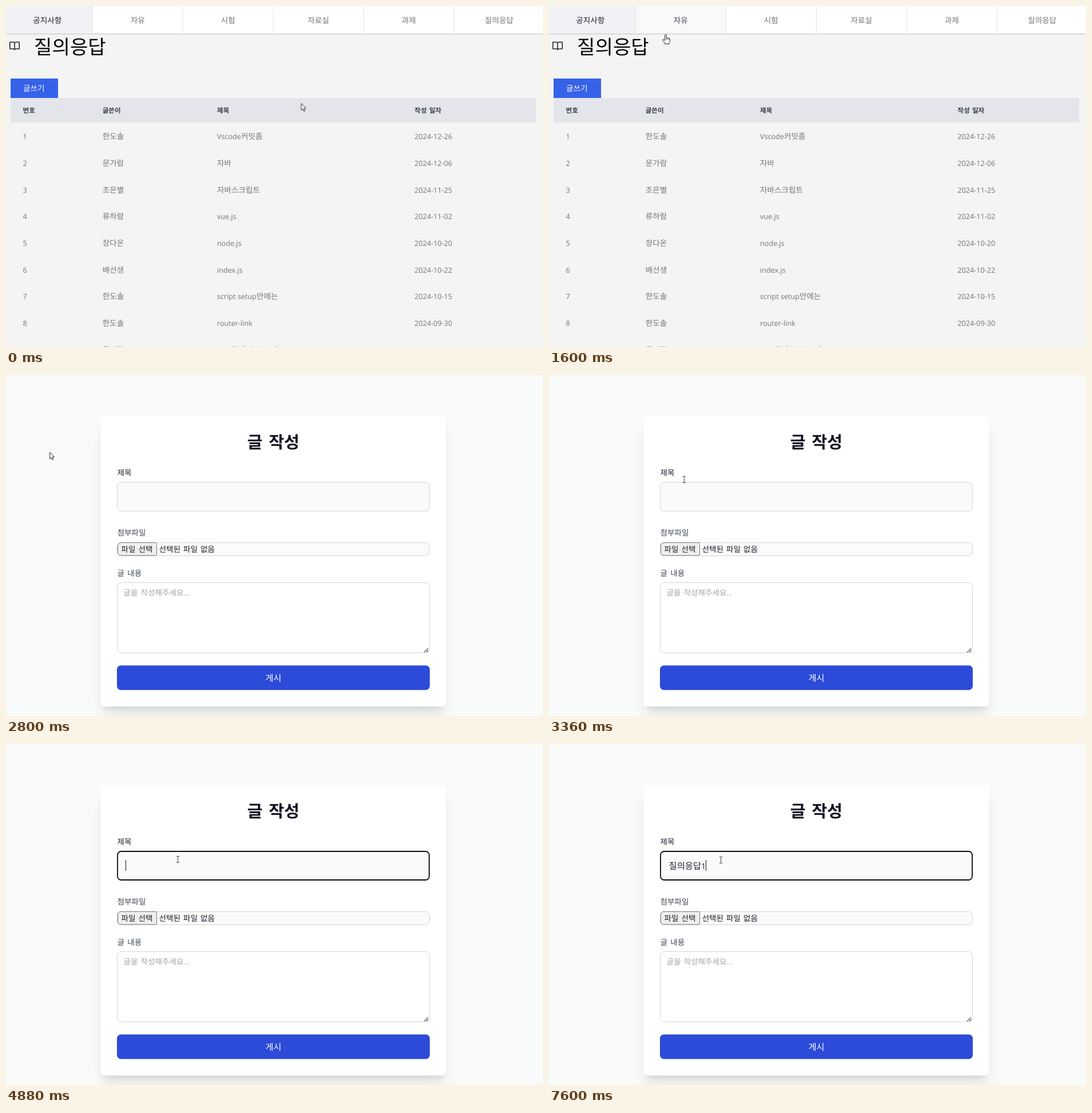
Write an HTML page that moves like this. It is 939 px wide and 597 px high and loops after 8000 ms.

```html
<!DOCTYPE html>
<html lang="ko">
<head>
<meta charset="utf-8">
<title>질의응답</title>
<style>
html, body { margin: 0; width: 100%; height: 100%; overflow: hidden; background: #f4f4f4; }
svg { display: block; width: 939px; height: 597px; }
text { font: 13.6px "Noto Sans CJK KR", "Noto Sans KR", sans-serif; fill: #70747b; white-space: pre; text-rendering: geometricPrecision; }
.latin { font-family: "Open Sans", "Noto Sans", sans-serif; font-size: 12.65px; }
.mid { text-anchor: middle; }
.head { font-size: 11.6px; font-weight: 700; fill: #343a48; word-spacing: 1px; }
.title { font-size: 34.2px; fill: #060608; }
.on { fill: #161b28; }
.white { fill: #fff; }
.label { fill: #3f4653; word-spacing: 1.4px; }
.dark { fill: #1b202c; word-spacing: 1.2px; }
.hint { fill: #a0a4ab; word-spacing: 1.2px; }
.big { font-size: 29.2px; font-weight: 700; fill: #111322; word-spacing: 2.6px; }
.post { font-size: 15.3px; font-weight: 500; }
.typed, .typed .latin { fill: #20242e; }
.typed { font-size: 15.4px; }
.typed .latin { font-size: 14px; }
.field { stroke: #d1d5db; }

/* 1% of the loop is 80 ms */
.list, .form, .tab, .tabText, .btn, .ring, .focus, .arrow, .hand, .beam { animation: 8s step-end infinite; }
.list { animation-name: list; }
.form { animation-name: form; }
.tab { animation-name: tab; }
.tabText { animation-name: tabText; }
.btn { animation-name: btn; }
.ring { animation-name: ring; }
.focus { animation-name: focus; }
.arrow { animation-name: arrow; }
.hand { animation-name: hand; }
.beam { animation-name: beam; }
.cursor { animation: path 8s linear infinite; }

@keyframes list { 0% { visibility: visible } 35%, 100% { visibility: hidden } }
@keyframes form { 0% { visibility: hidden } 35%, 100% { visibility: visible } }
@keyframes tab { 0% { fill: #fff } 16% { fill: #f8faf9 } 21%, 100% { fill: #fff } }
@keyframes tabText { 0% { fill: #70747b } 16% { fill: #454b57 } 21%, 100% { fill: #70747b } }
@keyframes btn { 0% { fill: #3662ea } 28%, 100% { fill: #2c4bd8 } }
@keyframes ring { 0% { opacity: 0 } 31%, 100% { opacity: 1 } }
@keyframes focus { 0% { opacity: 0 } 43%, 100% { opacity: 1 } }
@keyframes arrow { 0% { opacity: 1 } 16% { opacity: 0 } 21% { opacity: 1 } 28% { opacity: 0 } 35% { opacity: 1 } 42%, 100% { opacity: 0 } }
@keyframes hand { 0% { opacity: 0 } 16% { opacity: 1 } 21% { opacity: 0 } 28% { opacity: 1 } 35%, 100% { opacity: 0 } }
@keyframes beam { 0% { opacity: 0 } 42%, 100% { opacity: 1 } }
@keyframes path {
  0% { transform: translate(516.5px, 170.5px); animation-timing-function: steps(10) }
  10%, 12% { transform: translate(350px, 108px); animation-timing-function: steps(5) }
  17% { transform: translate(222px, 38px); animation-timing-function: steps(3) }
  20% { transform: translate(204px, 50px); animation-timing-function: steps(3) }
  23% { transform: translate(165px, 72px); animation-timing-function: steps(3) }
  26%, 27% { transform: translate(80px, 100px); animation-timing-function: steps(2) }
  29%, 37% { transform: translate(76.5px, 135px); animation-timing-function: steps(7) }
  44% { transform: translate(300.5px, 202px); animation-timing-function: step-end }
  95%, 100% { transform: translate(300.5px, 203px) }
}
</style>
</head>
<body>
<svg viewBox="0 0 939 597">
  <g class="list">
    <rect width="939" height="597" fill="#f4f4f4"/>
    <rect y="2" width="939" height="47" fill="#000" opacity=".2" style="filter:blur(1.2px)"/>
    <rect width="939" height="48" fill="#fff"/>
    <rect width="151" height="48" fill="#f1f2f6"/>
    <rect class="tab" x="152" width="157" height="48"/>
    <g id="tabs"></g>
    <g fill="none" stroke="#1f2937" stroke-width="1.6" stroke-linejoin="round">
      <path d="M15 65.2Q14.4 63.3 12 63.3H6.8V75H12.6Q14.4 75 15 76.8Q15.6 75 17.4 75H23.2V63.3H18Q15.6 63.3 15 65.2V76.5"/>
    </g>
    <text class="title" x="49" y="84">질의응답</text>
    <rect class="ring" x="5.5" y="124.5" width="88" height="39" rx="1" fill="#a4cafe"/>
    <rect x="8" y="161" width="919" height="43" fill="#e4e5ea"/>
    <rect class="ring" x="5.5" y="160" width="88" height="3.5" fill="#a4cafe"/>
    <rect class="btn" x="8" y="127" width="83" height="34"/>
    <text class="white" x="30" y="149">글쓰기</text>
    <g id="table"></g>
  </g>

  <g class="form">
    <rect width="939" height="597" fill="#f9fafa"/>
    <rect x="169.5" y="94.5" width="596" height="499" opacity=".1" style="filter:blur(11px)"/>
    <rect x="170.5" y="84.5" width="594" height="497" opacity=".1" style="filter:blur(4.5px)"/>
    <rect x="165" y="72" width="604.5" height="508.5" rx="7" fill="#fff"/>
    <text class="big mid" x="467.5" y="128">글 작성</text>
    <text class="label dark" x="194.5" y="175.5">제목</text>
    <rect class="field" x="194.5" y="187.5" width="546" height="51" rx="7" fill="#f9fafa"/>
    <rect class="focus" x="195" y="188" width="545" height="50" rx="6.5" fill="none" stroke="#0c0c10" stroke-width="1.8"/>
    <text class="typed" id="typed" x="209.5" y="218.5"></text>
    <rect id="mark" y="221" height="1" fill="#20242e"/>
    <rect id="caret" y="203" width="1" height="19" fill="#111"/>

    <text class="label" x="194.5" y="281">첨부파일</text>
    <rect class="field" x="194.5" y="293.5" width="546" height="23" rx="7" fill="#f9fafa"/>
    <path d="M200 293.5H261.5a2 2 0 0 1 2 2V314a2 2 0 0 1-2 2H200Q195.500 315 195.500 310V299Q195.500 294.500 200 293.500Z" fill="#efefef" stroke="#767676"/>
    <text class="dark" x="201.500" y="309.500">파일 선택</text>
    <text class="dark" x="267.500" y="309.500">선택된 파일 없음</text>

    <text class="label" x="194.5" y="352">글 내용</text>
    <rect class="field" x="194.5" y="363.5" width="546" height="123" rx="7" fill="#fff"/>
    <text class="hint" x="205.5" y="385.5">글을 작성해주세요<tspan class="latin">...</tspan></text>
    <path d="M731 485.500L738 478.500M735 485.500L738.500 482" stroke="#555" stroke-width="1.1"/>

    <rect x="194" y="508.5" width="547" height="43" rx="7" fill="#2c4bd8"/>
    <text class="post white mid" x="467.500" y="536">게시</text>
  </g>

  <g class="cursor">
    <path class="arrow" d="M0 0V12L2.700 9.500L4.600 13.600L6.300 12.800L4.500 8.900L8 8.500Z" fill="#fff" stroke="#222" stroke-width="1"/>
    <g class="hand" fill="#fff" stroke="#222" stroke-width="1" stroke-linejoin="round">
      <path d="M-1.300 9.500V1.300Q-1.300 0 0 0Q1.300 0 1.300 1.300V6Q2.600 5 3.700 6.300Q5 5.600 5.900 7Q7.500 6.600 7.500 8.500V11.500Q7.300 13 6 14.500V16.500H-1.300V15L-5.200 10Q-5.800 8.600 -4.300 8.300Q-3 8.300 -1.300 10.500Z"/>
      <path d="M1.300 6V9M3.700 6.500V9M5.900 7.200V9.300" stroke-width=".8"/>
    </g>
    <path class="beam" d="M-2.500 -5.500H-.8L0 -5L.8 -5.500H2.500M0 -5V5M-2.500 5.500H-.8L0 5L.8 5.500H2.500" fill="none" stroke="#333" stroke-width="1"/>
  </g>
</svg>
<script>
const $ = id => document.getElementById(id);
const mix = s => s.replace(/[!-~]+( [!-~]+)*/g, m => `<tspan class="latin">${m}</tspan>`);
const text = (x, y, s, cls = '') => `<text x="${x}" y="${y}" class="${cls}">${mix(s)}</text>`;

$('tabs').innerHTML = ['공지사항', '자유', '시험', '자료실', '과제', '질의응답'].map((name, i) =>
  text(72.3 + 158 * i, 30, name, 'mid ' + (['on', 'tabText'][i] || '')) +
  (i < 5 ? `<rect x="${151 + 158 * i}" width="1" height="48" fill="#e5e7eb"/>` : '')
).join('');

const cols = [29.5, 168.7, 369, 714.3];
const rows = [
  ['한도솔', 'Vscode커밋좀', '2024-12-26'],
  ['문가람', '자바', '2024-12-06'],
  ['조은별', '자바스크립트', '2024-11-25'],
  ['류하람', 'vue.js', '2024-11-02'],
  ['장다온', 'node.js', '2024-10-20'],
  ['배선생', 'index.js', '2024-10-22'],
  ['한도솔', 'script setup안에는', '2024-10-15'],
  ['한도솔', 'router-link', '2024-09-30'],
  ['문가람', '스프링에서 쓰는 태그', '2024-09-24']
];
$('table').innerHTML =
  ['번호', '글쓴이', '제목', '작성 일자'].map((s, i) => text(cols[i], 187, s, 'head')).join('') +
  rows.map((row, r) => [String(r + 1), ...row].map((s, i) =>
    text(cols[i], (233.2 + 46.7 * r).toFixed(1), s)).join('')).join('');

// start time, text, caret shown, last syllable still composing
const steps = [
  [0, '', 0, 0], [3440, '', 1, 0], [3680, '', 0, 0], [4640, '', 1, 0], [4880, '', 0, 0],
  [5600, '질', 1, 1], [5680, '질ㅇ', 1, 1], [5840, '질으', 1, 1], [5920, '질의', 1, 1], [6000, '질읭', 1, 1],
  [6720, '질의응', 1, 1], [6800, '질의응ㄷ', 1, 1], [7200, '질의응다', 1, 1], [7280, '질의응답', 1, 1],
  [7440, '질의응답1', 1, 0]
];
const clock = document.querySelector('.cursor').getAnimations()[0];
let shown;

function draw() {
  const now = (clock.currentTime || 0) % 8000;
  const step = steps.filter(s => s[0] <= now + 0.01).pop();
  if (step !== shown) {
    shown = step;
    const [, s, caret, composing] = step;
    const end = 209.5 + Math.min(s.length, 4) * 14.15 + (s.length > 4 ? 8 : 0);
    $('typed').innerHTML = mix(s);
    $('caret').setAttribute('x', Math.floor(end));
    $('caret').setAttribute('opacity', caret);
    $('mark').setAttribute('x', end - 14);
    $('mark').setAttribute('width', composing * 14);
  }
  requestAnimationFrame(draw);
}
draw();
</script>
</body>
</html>
```
